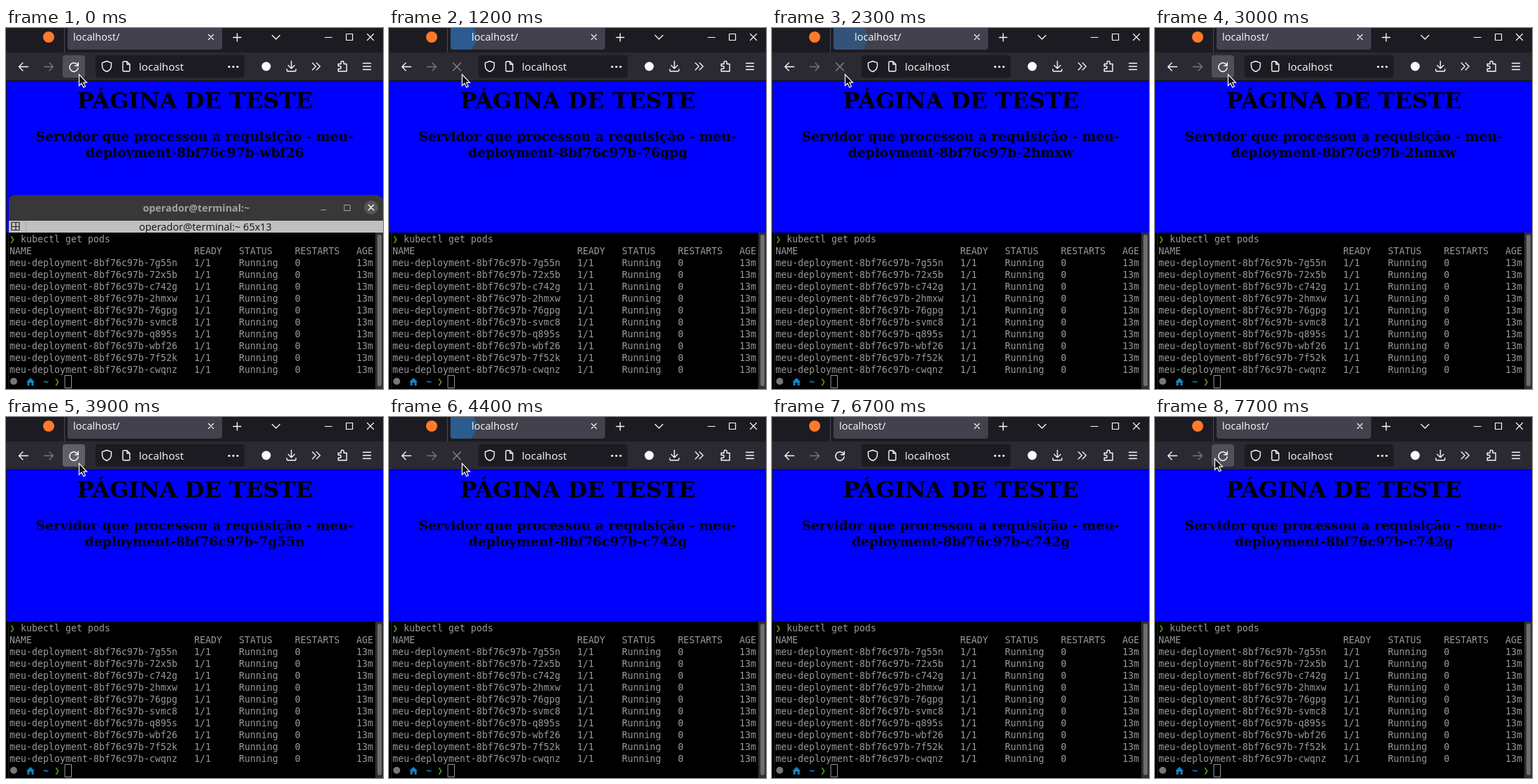
An HTML page with a canvas for the animation above (8000 ms loop, 539 by 517 pixels).

```html
<!DOCTYPE html>
<html lang="pt">
<head>
<meta charset="utf-8">
<title>Balanceamento entre pods</title>
<style>
html, body { margin: 0; width: 100%; height: 100%; overflow: hidden; background: #000; }
canvas { display: block; }
</style>
</head>
<body>
<canvas id="stage" width="539" height="517"></canvas>
<script>
const ctx = document.getElementById('stage').getContext('2d');
const LOOP = 8000, STEP = 100, LOAD_TIME = 500;
const UI = '"Open Sans", "Noto Sans", sans-serif';
const SERIF = '"DejaVu Serif", serif';
const MONO = '"DejaVu Sans Mono", monospace';
const LIGHT = '#fbfbfe', HOST = 'operador@terminal:~';

const pods = ['7g55n', '72x5b', 'c742g', '2hmxw', '76gpg', 'svmc8', 'q895s', 'wbf26', '7f52k', 'cwqnz'];
const podName = id => 'meu-deployment-8bf76c97b-' + id;

// Each reload: button pressed, loading begins, pod that answers.
const reloads = [
  { press: 800, load: 1000, pod: '76gpg' },
  { press: 1800, load: 2000, pod: '2hmxw' },
  { press: 2800, load: 3100, pod: '7g55n' },
  { press: 3900, load: 4200, pod: 'c742g' }
];

// Pointer stops: time, x, y
const pointerPath = [
  [0, 104, 66], [4700, 104, 66], [4800, 122, 78], [4900, 122, 78],
  [5200, 480, 52], [5300, 600, 45], [6200, 578, 219], [6600, 167, 24],
  [6700, 64, -25], [6900, 44, -25], [7000, 45, 2], [7300, 62, 34], [7700, 85, 59], [LOOP, 85, 59]
];

function pointerAt(t) {
  const i = pointerPath.findIndex(stop => stop[0] > t);
  const [t0, x0, y0] = pointerPath[i - 1], [t1, x1, y1] = pointerPath[i];
  const k = (t - t0) / (t1 - t0);
  return [x0 + (x1 - x0) * k, y0 + (y1 - y0) * k];
}

function rect(x, y, w, h, color, radius = 0) {
  ctx.fillStyle = color;
  ctx.beginPath();
  ctx.roundRect(x, y, w, h, radius);
  ctx.fill();
}

function disc(x, y, r, color) {
  ctx.fillStyle = color;
  ctx.beginPath();
  ctx.arc(x, y, r, 0, 7);
  ctx.fill();
}

function text(str, x, y, font, color, align = 'left') {
  ctx.font = font;
  ctx.fillStyle = color;
  ctx.textAlign = align;
  ctx.fillText(str, x, y);
}

// Strokes an icon whose path is relative to its centre.
function icon(x, y, path, color = LIGHT, width = 1.4) {
  ctx.save();
  ctx.translate(x, y);
  ctx.strokeStyle = color;
  ctx.lineWidth = width;
  ctx.lineCap = ctx.lineJoin = 'round';
  ctx.stroke(new Path2D(path));
  ctx.restore();
}

const cross = r => `M${-r} ${-r}L${r} ${r}M${r} ${-r}L${-r} ${r}`;
const ARROW = 'M6.5 0H-6.5M-1 -5.5L-6.5 0L-1 5.5';
const RELOAD = 'M5.6 -2.6A6.2 6.2 0 1 0 6.2 1M6.3 -6.5V-2H1.8';
const SHIELD = 'M0 -7.5L6.5 -5.2V-1C6.5 3 4 6 0 7.5C-4 6 -6.5 3 -6.5 -1V-5.2Z';
const PAGE = 'M-5 -5.5Q-5 -7 -3.5 -7H1L5 -3V5.5Q5 7 3.5 7H-3.5Q-5 7 -5 5.5ZM1 -7V-3H5';
const DOWNLOAD = 'M0 -7.5V3M-4.5 -1.5L0 3L4.5 -1.5M-6.5 4V5.5Q-6.5 7 -5 7H5Q6.5 7 6.5 5.5V4';
const PUZZLE = 'M-6 -3.5H-2V-5.5A2 2 0 0 1 2 -5.5V-3.5H6V7H-6V3.5H-4A2 2 0 0 0 -4 -.5H-6Z';

function drawTab(loadAge) {
  rect(0, 0, 539, 35, '#1c1b22');
  rect(83, 0, 1, 35, '#4b4a54');
  disc(61, 13, 8, '#ff7a2a');
  rect(88, 0, 221, 31, '#42414d', [0, 0, 4, 4]);
  if (loadAge >= 100) {
    const k = (loadAge - 100) / 400;
    ctx.save();
    ctx.beginPath();
    ctx.roundRect(88, 0, 221, 31, [0, 0, 4, 4]);
    ctx.clip();
    ctx.globalAlpha = 0.85 * (1 - k);
    disc(102, 13, 12 + 44 * k, '#1f6bb4');
    ctx.restore();
  } else if (loadAge >= 0) {
    disc(100, 13, 4, '#1f8ae0');
  }
  text('localhost/', loadAge >= 0 ? 118 : 96, 18, '14.6px ' + UI, LIGHT);
  icon(293, 13, cross(3.5), LIGHT, 1.2);
  icon(330.5, 13.5, 'M-5.5 0H5.5M0 -5.5V5.5');
  icon(386, 13, 'M-5.5 -2.5L0 3L5.5 -2.5');
  icon(461, 13.5, 'M-5 0H5', LIGHT, 1.2);
  icon(491, 13, 'M-4.5 -4.5H4.5V4.5H-4.5Z', LIGHT, 1.2);
  icon(521, 13, cross(4.5), LIGHT, 1.2);
}

function drawToolbar(loading, pressed, hover) {
  rect(0, 35, 539, 41, '#2b2a33');
  rect(0, 75, 539, 1, '#0c0c0d');
  icon(25, 55.5, ARROW);
  icon(61, 55.5, 'M-6.5 0H6.5M1 -5.5L6.5 0L1 5.5', '#77767d');
  if (loading) {
    icon(97, 55.5, cross(5.5), '#85848a');
  } else {
    if (pressed || hover) rect(81, 39, 32, 32, pressed ? '#5f6067' : '#4e4f57', 4);
    icon(97, 56, RELOAD, LIGHT, 1.5);
  }
  rect(128, 39, 213, 32, '#1c1b22', 4);
  icon(144, 55, SHIELD);
  icon(172, 55, PAGE);
  text('localhost', 190, 61, '15.3px ' + UI, LIGHT);
  for (const x of [319, 325, 331]) disc(x, 55.5, 1.6, LIGHT);
  disc(372, 55, 6.5, LIGHT);
  icon(408, 55, DOWNLOAD);
  icon(443, 55, 'M-5 -5L0 0L-5 5M1 -5L6 0L1 5');
  icon(481, 55, PUZZLE);
  icon(516, 55, 'M-5.5 -4.5H5.5M-5.5 0H5.5M-5.5 4.5H5.5');
}

function drawPage(pod) {
  rect(0, 76, 539, 217, '#00f');
  rect(0, 76, 1, 217, '#1c1b22');
  const heading = 'bold 18.72px ' + SERIF;
  text('PÁGINA DE TESTE', 270, 115, 'bold 32px ' + SERIF, '#000', 'center');
  text('Servidor que processou a requisição - meu-', 269.5, 162, heading, '#000', 'center');
  text(podName(pod).slice(4), 270, 185, heading, '#000', 'center');
}

function drawTerminalHeader() {
  rect(4, 239, 535, 38, '#383838', [9, 9, 0, 0]);
  text(HOST, 272, 263, 'bold 14.3px ' + UI, '#a3a3a3', 'center');
  icon(454, 260.5, 'M-3.5 0H3.5', '#a3a3a3', 1);
  icon(488, 257.5, 'M-4 -4H4V4H-4Z', '#a3a3a3', 1);
  disc(522, 257, 10, '#565656');
  icon(522, 257, cross(3.7), '#fff', 1.4);
  rect(4, 276, 535, 17, '#c0c0c0');
  rect(28, 276, 1, 17, '#aaa');
  icon(14, 284.5, 'M-6 -6H5V5H-6ZM-6 0H5M0 -6V5', '#222', 1.2);
  text(HOST + ' 65x13', 285, 290, '14.5px ' + UI, '#111', 'center');
}

function drawTerminal() {
  const font = '13.29px ' + MONO, gray = '#999', green = '#4e9a06', blue = '#1583c4';
  const columns = [5, 269, 333, 413, 501];
  const row = (cells, y) => cells.forEach((cell, i) => text(cell, columns[i], y, font, gray));
  rect(0, 293, 539, 224, '#000');
  rect(3, 293, 1, 224, '#1c1c1c');
  text('❯', 5, 307, font, green);
  text('kubectl get pods', 21, 307, font, gray);
  row(['NAME', 'READY', 'STATUS', 'RESTARTS', 'AGE'], 324);
  pods.forEach((id, i) => row([podName(id), '1/1', 'Running', '0', '13m'], 341 + 17 * i));

  disc(11, 506, 5, '#777');
  ctx.fillStyle = blue;
  ctx.fill(new Path2D('M29 507L35 501L41 507H39.5V512H36.5V508H33.5V512H30.5V507Z'));
  text('~', 53, 511, 'bold ' + font, blue);
  text('❯', 69, 511, font, green);
  icon(89, 506.5, 'M-4.5 -9H4.5V9H-4.5Z', '#999', 1);

  rect(528, 293, 11, 224, '#303030');
  rect(531, 296, 6, 217, '#6e6e6e', 3);
}

function drawPointer(x, y) {
  const shape = new Path2D('M.5 .5V16.5L4 13.2L6.8 19L9.4 17.8L6.8 12.2H11.5Z');
  ctx.save();
  ctx.translate(Math.round(x), Math.round(y));
  ctx.fillStyle = '#111';
  ctx.strokeStyle = '#fff';
  ctx.lineWidth = 1.2;
  ctx.fill(shape);
  ctx.stroke(shape);
  ctx.restore();
}

function draw(now) {
  const t = Math.floor((now % LOOP) / STEP) * STEP;
  const [x, y] = pointerAt(t);
  const active = reloads.find(r => t >= r.load && t < r.load + LOAD_TIME);
  const answered = reloads.filter(r => t >= r.load + 100).pop();
  const pressed = reloads.some(r => t >= r.press && t < r.press + 200);
  const hover = x >= 81 && x <= 113 && y >= 39 && y <= 71;

  drawTab(active ? t - active.load : -1);
  drawToolbar(!!active, pressed, hover);
  drawPage(answered ? answered.pod : 'wbf26');
  drawTerminal();
  if (t < reloads[0].press) drawTerminalHeader();
  drawPointer(x, y);
  requestAnimationFrame(draw);
}
requestAnimationFrame(draw);
</script>
</body>
</html>
```
